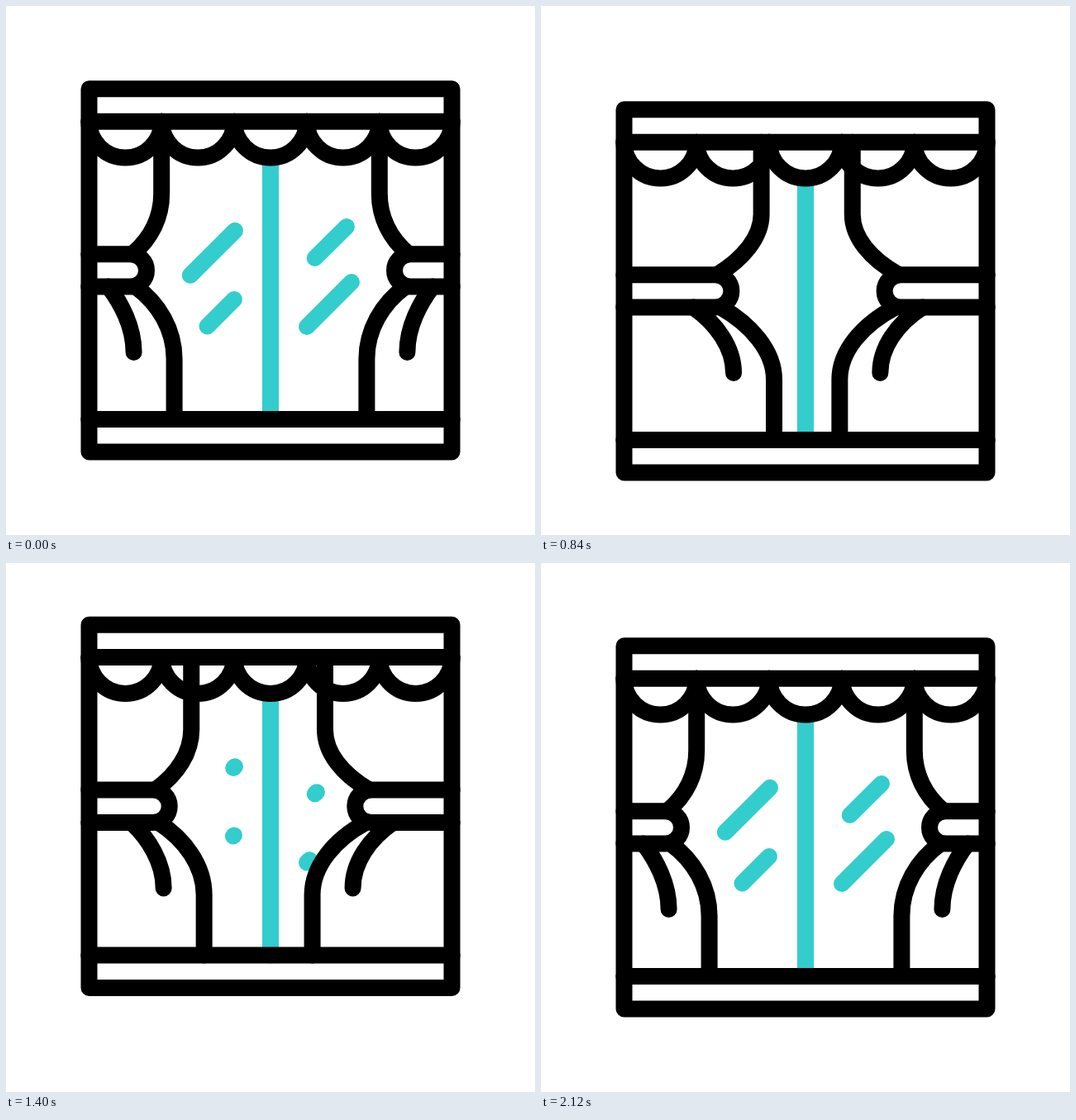
Recreate the animation shown at these times as an HTML page with a canvas. Size 640 px wide and 640 px high, loop 2440 ms.

```html
<!DOCTYPE html>
<html lang="en">
<head>
<meta charset="utf-8">
<title>Curtained window</title>
<style>
html, body { margin: 0; width: 100%; height: 100%; overflow: hidden; background: #fff; }
canvas { display: block; width: 640px; height: 640px; }
</style>
</head>
<body>
<canvas id="stage" width="640" height="640"></canvas>
<script>
const ctx = document.getElementById('stage').getContext('2d');
const LOOP = 2440, STEP = 40, HOLD = 200, LAST = 48;
const BLACK = '#000', CYAN = '#33cdcd';
const SWAY = 25.6, PULL = 80.2;

const clamp = (v, lo, hi) => Math.min(hi, Math.max(lo, v));
const mix = (a, b, p) => a + (b - a) * p;
const part = (k, from, to) => clamp((k - from) / (to - from), 0, 1);
const smooth = p => p * p * (3 - 2 * p);

// cubic-bezier(.551, 0, .141, 1)
function snap(p) {
  if (p <= 0 || p >= 1) return clamp(p, 0, 1);
  let lo = 0, hi = 1;
  for (let i = 0; i < 30; i++) {
    const s = (lo + hi) / 2, r = 1 - s;
    const x = 3 * s * r * r * 0.551 + 3 * s * s * r * 0.141 + s * s * s;
    if (x < p) lo = s; else hi = s;
  }
  return smooth(lo);
}

function sway(k) {
  if (k < 15) return SWAY * smooth(part(k, 0, 15));
  if (k < 30) return mix(SWAY, -SWAY, smooth(part(k, 15, 30)));
  return mix(-SWAY, 0, smooth(part(k, 30, 45)));
}

const pull = (k, a, b, c, d) => PULL * (snap(part(k, a, b)) - snap(part(k, c, d)));

function stroke(color, build) {
  ctx.strokeStyle = color;
  ctx.beginPath();
  build();
  ctx.stroke();
}

function line(color, x1, y1, x2, y2) {
  stroke(color, () => { ctx.moveTo(x1, y1); ctx.lineTo(x2, y2); });
}

// A streak grows from its fixed end; nothing is drawn at zero length.
function streak(x, y, dx, dy, size) {
  if (size > 0) line(CYAN, x, y, x + dx * size, y + dy * size);
}

// d: shift of the hanging edges, grip: share of it taken by the tie
function curtain(d, grip) {
  const tie = d * grip, bend = d * 0.87;
  stroke(BLACK, () => {
    ctx.moveTo(188.2 + d, 139.7);
    ctx.lineTo(188.2 + d, 227);
    ctx.bezierCurveTo(188.2 + d, 255, 176 + bend, 281, 153 + tie, 300);
  });
  stroke(BLACK, () => {
    ctx.moveTo(100.3, 300.2);
    ctx.lineTo(150.3 + tie, 300.2);
    ctx.arc(150.3 + tie, 319.9, 19.7, -Math.PI / 2, Math.PI / 2);
    ctx.lineTo(100.3, 339.6);
  });
  stroke(BLACK, () => {
    ctx.moveTo(157 + tie, 339.6);
    ctx.bezierCurveTo(185 + bend, 360, 203.6 + d, 392, 203.6 + d, 427);
    ctx.lineTo(203.6 + d, 500);
  });
  stroke(BLACK, () => {
    ctx.moveTo(124 + tie, 339.6);
    ctx.bezierCurveTo(139 + d * 0.93, 359, 154.6 + d, 388, 154.6 + d, 419);
  });
}

function mirrored(draw) {
  ctx.save();
  ctx.translate(640, 0);
  ctx.scale(-1, 1);
  draw();
  ctx.restore();
}

function paint(k) {
  ctx.fillStyle = '#fff';
  ctx.fillRect(0, 0, 640, 640);
  ctx.save();
  ctx.translate(0, sway(k));
  ctx.lineWidth = 20;
  ctx.lineCap = ctx.lineJoin = 'round';

  line(CYAN, 320, 184, 320, 500);
  const gone = 1 - snap(part(k, 0, 9.7));
  const left = gone + snap(part(k, 27.7, 42.9));
  const right = gone + snap(part(k, 27.1, 42.5));
  streak(277, 271.8, -54.2, 54, left);
  streak(276, 355, -32.5, 32.5, left);
  streak(373.7, 305, 38.3, -38, right);
  streak(364, 388, 54, -54, right);

  curtain(pull(k, 0, 20, 20, 45), 0.77);
  mirrored(() => curtain(pull(k, 3, 22, 23, 48), 0.725));

  stroke(BLACK, () => ctx.rect(100.5, 100.3, 439, 439.2));
  line(BLACK, 100.3, 139.7, 539.7, 139.7);
  line(BLACK, 100.3, 500, 539.7, 500);
  for (let i = 0; i < 5; i++) {
    stroke(BLACK, () => ctx.arc(144.4 + 87.8 * i, 139.7, 43.9, 0, Math.PI));
  }
  ctx.restore();
}

function tick() {
  const t = performance.now() % LOOP;
  paint(clamp(Math.floor((t - HOLD) / STEP), 0, LAST));
  requestAnimationFrame(tick);
}
tick();
</script>
</body>
</html>
```
